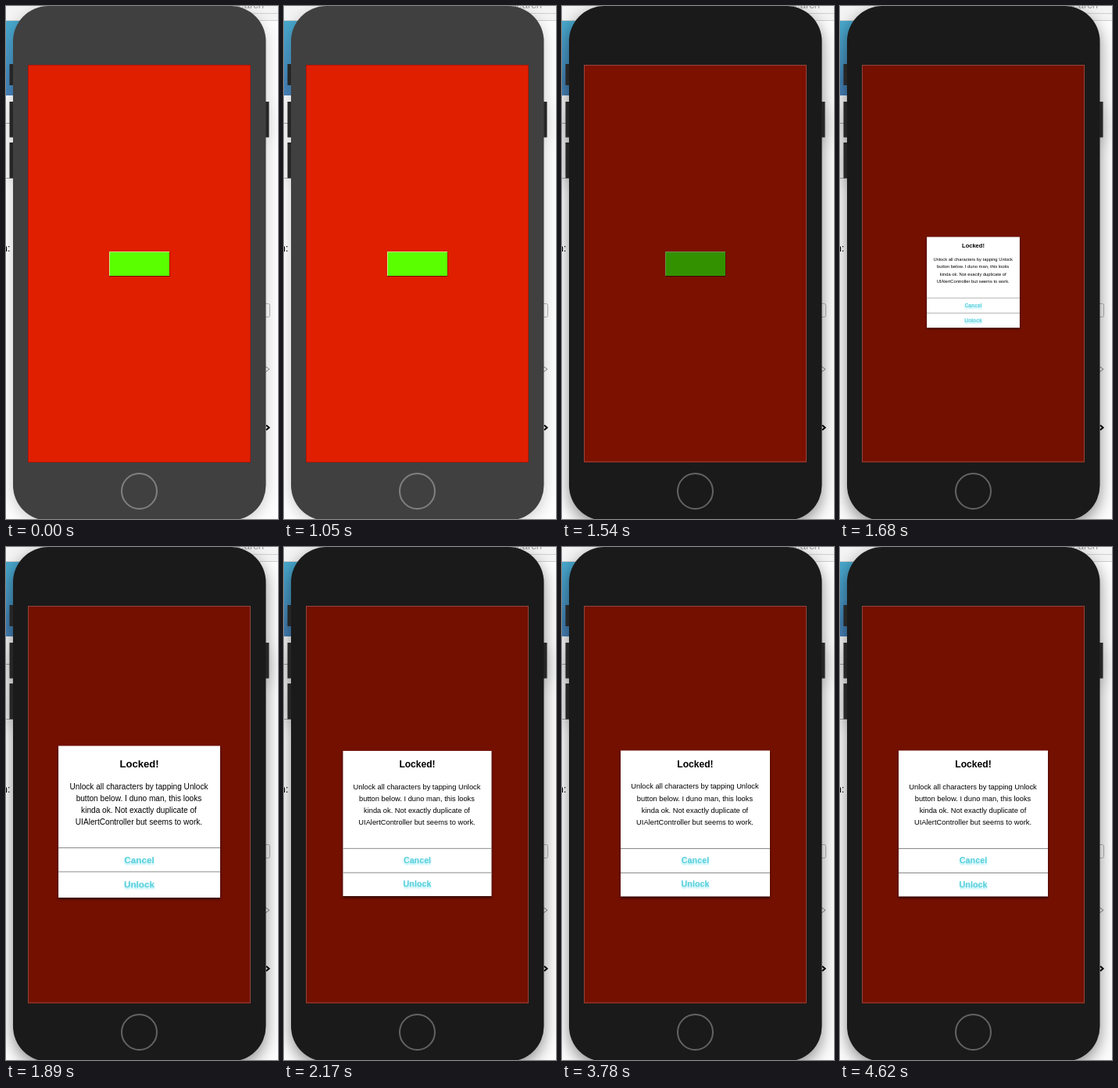
These frames come from a looping animation (348 px wide and 654 px high, 4.69 s). An HTML page:

```html
<!DOCTYPE html>
<html lang="en">
<head>
<meta charset="utf-8">
<title>Unlock alert</title>
<style>
  html, body { margin: 0; width: 100%; height: 100%; overflow: hidden; background: #fff; }
  svg { display: block; width: 348px; height: 654px; font-family: "Liberation Sans", Arial, sans-serif; }
  #alert text { text-anchor: middle; }
  .title, .action { font-weight: bold; }
  .action { fill: #58cfdb; text-shadow: 0 2px 2px rgba(60, 215, 235, .55); }
  #card { filter: drop-shadow(0 2px 1.5px rgba(0, 0, 0, .6)); }
</style>
</head>
<body>
<svg viewBox="0 0 348 654">
  <defs>
    <linearGradient id="banner" x2="0" y2="1">
      <stop stop-color="#48a8cc"/><stop offset="1" stop-color="#4784bd"/>
    </linearGradient>
  </defs>

  <!-- window behind the phone -->
  <rect width="348" height="654" fill="#fdfdfd"/>
  <rect width="348" height="18" fill="#f4f4f4"/>
  <path d="M300 9.5H348M0 18.5H348" stroke="#cfcfcf"/>
  <text x="330" y="3" font-size="13" text-anchor="end" fill="#999">Search</text>
  <rect y="19" width="20" height="95" fill="url(#banner)"/>
  <path d="M0 149.5H12M0 219.5H12" stroke="#aaa"/>
  <text x="5.5" y="313" font-size="12.5" text-anchor="end">n:</text>
  <rect x="310" y="379.5" width="27.500" height="17" rx="2" fill="none" stroke="#b5b5b5"/>
  <path d="M332 459.500L337 463L332 466.500" fill="none" stroke="#888"/>
  <path d="M333 534.500L336.500 537.500L333 540.500" fill="none" stroke="#000" stroke-width="2"/>

  <g id="phone">
    <path d="M4.500 74h8v27h-8zM4.500 122h8v45.500h-8zM4.500 174h8v45.500h-8zM328 122h8.500v45.500h-8.500z" fill="#262626"/>
    <rect id="body" x="9" y="0" width="323.500" height="656" rx="45"/>
  </g>
  <circle id="home" cx="170.500" cy="618.500" r="22.500" fill="none" stroke-width="2"/>

  <rect id="screen" x="28" y="75" width="285" height="507"/>
  <path id="bevel" d="M28 75.500H313M28 581.500H313M312.500 75V582M28.500 75V582" stroke="#600" stroke-opacity=".35"/>
  <rect x="132" y="313.500" width="77.500" height="31.500" fill="#300" opacity=".65"/>
  <rect x="132" y="313" width="77" height="31" fill="#5aff00"/>
  <path d="M132.500 344V313.500H209" fill="none" stroke="#c8f58c"/>
  <rect id="dim" x="28" y="75" width="285" height="507"/>
  <rect id="rim" x="28.500" y="75.500" width="284" height="505.500" fill="none" stroke="#fff" stroke-opacity=".22"/>

  <g id="alert">
    <rect id="card" fill="#fff"/>
    <path id="rules" stroke="#8a8a8a"/>
    <text class="title" data-size="12.1" x="170.500" y="281">Locked!</text>
    <text data-size="9.35" x="170" y="308.500">Unlock all characters by tapping Unlock</text>
    <text data-size="9.35" x="170" y="323.700">button below. I duno man, this looks</text>
    <text data-size="9.35" x="170" y="338.900">kinda ok. Not exactly duplicate of</text>
    <text data-size="9.35" x="170" y="354">UIAlertController but seems to work.</text>
    <text class="action" data-size="10.8" x="170.500" y="403">Cancel</text>
    <text class="action" data-size="10.8" x="170.500" y="433.500">Unlock</text>
  </g>
</svg>
<script>
const LOOP = 4690, FOCUS = 1120, DIM = 1475, POP = 1540;
const OVERSHOOT = 0.084;
const el = id => document.getElementById(id);
const set = (id, attrs) => {
  for (const name in attrs) el(id).setAttribute(name, attrs[name]);
};
const labels = [...document.querySelectorAll('#alert text')];

// Underdamped spring from 0 to 1, time in seconds.
function spring(t) {
  const decay = 7.19, freq = 9.1;
  return 1 - Math.exp(-decay * t) * (Math.cos(freq * t) + decay / freq * Math.sin(freq * t));
}

function drawAlert(t) {
  const scale = t > 0 ? spring(t / 1000) : 0;
  const over = Math.max(0, scale - 1) / OVERSHOOT;
  const shrink = Math.min(1, scale);
  const left = 75 - 8 * over, right = 266 + 8 * over;
  const top = 259.5 - 6 * over, bottom = 445.5 + 1.5 * over;
  set('alert', {
    visibility: t > 0 ? 'visible' : 'hidden',
    transform: `translate(170.5 352) scale(${shrink}) translate(-170.5 -352)`
  });
  set('card', { x: left, y: top, width: right - left, height: bottom - top });
  const first = 384.5 - over, second = 415.5 - 1.5 * over;
  set('rules', { d: `M${left} ${first}H${right}M${left} ${second}H${right}` });
  for (const label of labels) {
    label.setAttribute('font-size', label.dataset.size * (1 + OVERSHOOT * over));
  }
}

function draw(t) {
  const focused = t >= FOCUS, dimmed = t > DIM;
  set('body', { fill: focused ? '#1a1a1a' : '#404040' });
  set('home', { stroke: focused ? '#636363' : '#808080' });
  set('screen', { fill: focused ? '#d91e00' : '#e01f00' });
  el('phone').style.filter = focused
    ? 'drop-shadow(0 7px 10px rgba(0,0,0,.45))'
    : 'drop-shadow(0 4px 9px rgba(0,0,0,.2))';
  set('dim', { opacity: dimmed ? 0.47 * (1 - Math.exp((DIM - t) / 26)) : 0 });
  set('rim', { visibility: dimmed ? 'visible' : 'hidden' });
  set('bevel', { visibility: dimmed ? 'hidden' : 'visible' });
  drawAlert(t - POP);
}

function frame() {
  draw(performance.now() % LOOP);
  requestAnimationFrame(frame);
}
frame();
</script>
</body>
</html>
```
